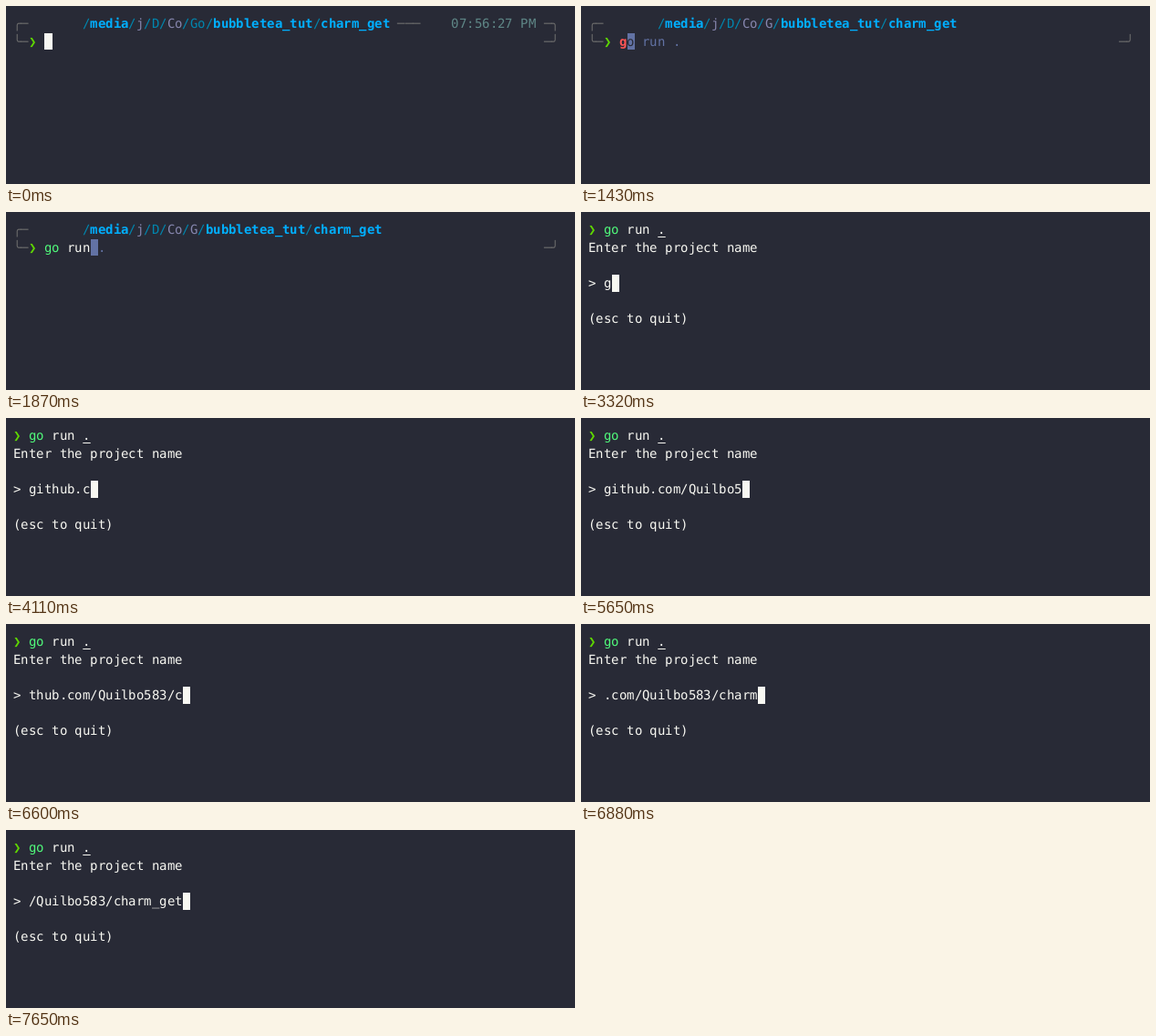
Recreate the animation shown at these times as an HTML page with a canvas. Size 624x196 px, loop 8 s.

```html
<!DOCTYPE html>
<html lang="en">
<head>
<meta charset="utf-8">
<title>Terminal session</title>
<style>
  html, body { margin: 0; width: 624px; height: 196px; overflow: hidden; background: #282a36; }
  canvas { display: block; }
</style>
</head>
<body>
<canvas id="stage" width="624" height="196"></canvas>
<script>
const LOOP = 8000;
const SIZE = 14, LINE = SIZE * 1.4, CELL = SIZE * 1233 / 2048;
const BG = '#282a36', FG = '#f8f8f2', DIM = '#6272a4', GREEN = '#50fa7b', RED = '#ff5555';
const FRAME = '#6c6c6c', DIR = '#0087af', SHORT = '#8787af', ANCHOR = '#00afff';
const CLOCK = '#5f8787', PROMPT = '#5fd700';

const COMMAND = 'go run .';
const COMMAND_KEYS = [1430, 1505, 1580, 1655, 1730, 1870, 1940, 2070];
const PROJECT = 'github.com/Quilbo583/charm_get';
const PROJECT_KEYS = [
  3320, 3420, 3500, 3580, 3730, 3850, 4020, 4110, 4220, 4300, 4480,
  5120, 5270, 5320, 5370, 5420, 5470, 5650, 5780, 5830, 6030,
  6600, 6670, 6740, 6810, 6880, 7280, 7430, 7580, 7650
];
const PLACEHOLDER = 'github.com/username/p';
const PLACEHOLDER_COLOR = '#585858';
const FIELD_WIDTH = 20;

const ctx = document.getElementById('stage').getContext('2d', { alpha: false });
const cellX = col => CELL * (col + 1);
const cellY = row => LINE * (row + 0.5);
const baseline = row => Math.ceil(cellY(row) + SIZE);
const typedCount = (keys, t) => keys.filter(key => key <= t).length;

// Draws text with each glyph on a whole pixel and returns the column after it.
function print(row, col, text, color = FG, bold = false) {
  ctx.font = `${bold ? 'bold ' : ''}${SIZE}px "DejaVu Sans Mono", monospace`;
  ctx.textRendering = 'geometricPrecision';
  ctx.fillStyle = color;
  for (const char of text) {
    if (char !== ' ') ctx.fillText(char, Math.floor(cellX(col)), baseline(row));
    col++;
  }
  return col;
}

function cursor(row, col, color = FG, char = ' ') {
  const left = Math.round(cellX(col)), right = Math.round(cellX(col + 1));
  const top = Math.ceil(cellY(row)), bottom = Math.floor(cellY(row + 1));
  ctx.fillStyle = color;
  ctx.fillRect(left, top, right - left, bottom - top);
  print(row, col, char, BG);
}

function drawCommand(row, col, count) {
  const typed = COMMAND.slice(0, count);
  print(row, col, typed.slice(0, 2), count === 1 ? RED : GREEN, count === 1);
  print(row, col + 2, typed.slice(2));
  if (count === COMMAND.length) {
    ctx.fillRect(cellX(col + 7), baseline(row) + 3, CELL, 1);
  }
}

function drawPath(shortened) {
  const parts = [
    ['media', ANCHOR], ['j', SHORT], ['D', DIR], ['Co', SHORT],
    shortened ? ['G', SHORT] : ['Go', DIR],
    ['bubbletea_tut', ANCHOR], ['charm_get', ANCHOR]
  ];
  let col = 9;
  for (const [name, color] of parts) {
    col = print(0, col, '/', DIR);
    col = print(0, col, name, color, color === ANCHOR);
  }
}

function drawShell(t) {
  const settled = t >= 340;
  print(0, 0, '╭─', FRAME);
  drawPath(settled);
  if (!settled) {
    print(0, 50, '───', FRAME);
    print(0, 57, '07:56:27 PM', CLOCK);
    print(0, 69, '─╮', FRAME);
  }
  print(1, 0, '╰─', FRAME);
  print(1, 2, '❯', PROMPT);
  print(1, 69, '─╯', FRAME);

  const count = typedCount(COMMAND_KEYS, t);
  drawCommand(1, 4, count);
  const suggestion = count ? COMMAND.slice(count) : '';
  print(1, 5 + count, suggestion.slice(1), DIM);
  cursor(1, 4 + count, suggestion ? DIM : FG, suggestion[0]);
}

function drawProgram(t) {
  print(0, 0, '❯', PROMPT);
  drawCommand(0, 2, COMMAND.length);
  if (t < 2430) {
    cursor(1, 0);
    return;
  }
  print(1, 0, 'Enter the project name');
  print(3, 0, '>');
  print(5, 0, '(esc to quit)');

  const typed = PROJECT.slice(0, typedCount(PROJECT_KEYS, t));
  if (typed) {
    cursor(3, print(3, 2, typed.slice(-FIELD_WIDTH)));
  } else {
    print(3, 3, PLACEHOLDER.slice(1), PLACEHOLDER_COLOR);
    cursor(3, 2, FG, PLACEHOLDER[0]);
  }
}

const start = performance.now();

function render() {
  const t = (performance.now() - start) % LOOP;
  ctx.fillStyle = BG;
  ctx.fillRect(0, 0, 624, 196);
  if (t < 2240) drawShell(t);
  else drawProgram(t);
  requestAnimationFrame(render);
}

render();
</script>
</body>
</html>
```
